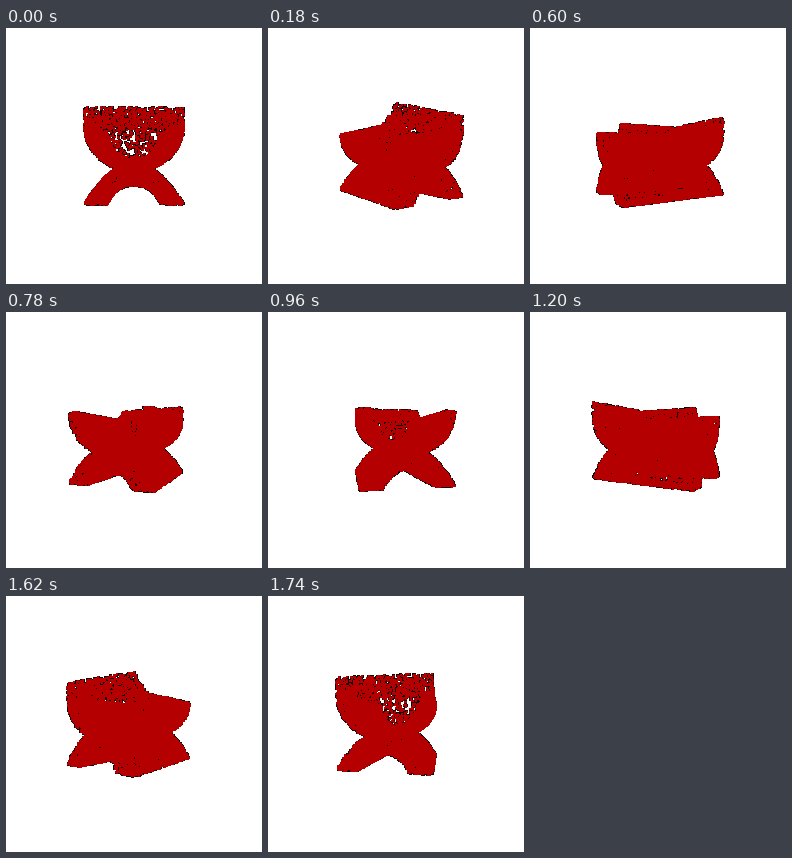
An HTML page with a canvas for the animation above (1.8 s loop, 256 by 256 pixels).

```html
<!DOCTYPE html>
<html lang="en">
<head>
<meta charset="utf-8">
<title>Turning chair</title>
<style>
html, body { margin: 0; width: 100%; height: 100%; overflow: hidden; background: #fff; }
canvas { display: block; width: 256px; height: 256px; }
</style>
</head>
<body>
<canvas id="stage" width="256" height="256"></canvas>
<script>
const SIZE = 256, MID = 128;
const LOOP = 1800, STEP = 60, STEPS = LOOP / STEP;
const DENSITY = 620, THIN = 270;  // points per unit of surface
const EYE = 5.5, ZOOM = 208;      // camera distance and scale
const DEPTH = 1.34;               // half length of the chair, front to back
const TOP = 0.98, ARM = 0.61, FLOOR = -0.97;
const BOWL = { rx: 1, ry: 0.92 }, HOLLOW = { rx: 0.8, ry: 0.74 };
const ARCH = { r: 0.57, y: -1.16 };
// Side profile of the back, as [z, y]
const BACK = [[0.9, ARM], [1.1, 0.75], [1.25, 0.79], [DEPTH, TOP]];

const ctx = document.getElementById("stage").getContext("2d");
const image = ctx.createImageData(SIZE, SIZE);
const pixels = new Uint32Array(image.data.buffer);
const WHITE = 0xffffffff, BLACK = 0xff000010, RED = 0xff0000b4;

let seed = 7;
function random() {
  seed = (Math.imul(seed, 1664525) + 1013904223) >>> 0;
  return seed / 4294967296;
}
const between = (a, b) => a + (b - a) * random();
const along = () => between(-DEPTH, DEPTH);

const points = [];
function scatter(area, density, place) {
  for (let i = Math.round(area * density); i > 0; i--) {
    const p = place();
    if (p) points.push(p);
  }
}

const legTop = x => -0.16 - (0.16 + FLOOR) * -x * x;
const within = (e, x, y) => Math.hypot(x / e.rx, (y - ARM) / e.ry) < 1;
const inSeat = (x, y) => y <= ARM && within(BOWL, x, y) && !within(HOLLOW, x, y);
const inLegs = (x, y) => y >= FLOOR && y <= legTop(x) && Math.hypot(x, y - ARCH.y) >= ARCH.r;

function backTop(z) {
  for (let i = 1; i < BACK.length; i++) {
    const [z0, y0] = BACK[i - 1], [z1, y1] = BACK[i];
    if (z <= z1) return y0 + (y1 - y0) * (z - z0) / (z1 - z0);
  }
  return TOP;
}

function addSeat() {
  for (const e of [BOWL, HOLLOW]) {
    scatter(Math.PI * e.rx * 2 * DEPTH, DENSITY, () => {
      const a = between(-Math.PI, 0);
      return [e.rx * Math.cos(a), ARM + e.ry * Math.sin(a), along()];
    });
  }
  for (const side of [-1, 1]) {
    scatter(0.2 * 2 * DEPTH, DENSITY, () => [side * between(HOLLOW.rx, 1), ARM, along()]);
  }
}

function addLegs() {
  scatter(2.7 * 2 * DEPTH, DENSITY, () => {
    const x = between(-1, 1);
    return [x, legTop(x), along()];
  });
  const spread = Math.acos((FLOOR - ARCH.y) / ARCH.r);
  scatter(2 * spread * ARCH.r * 2 * DEPTH, DENSITY, () => {
    const a = between(-spread, spread);
    return [ARCH.r * Math.sin(a), ARCH.y + ARCH.r * Math.cos(a), along()];
  });
  for (const side of [-1, 1]) {
    scatter(0.46 * 2 * DEPTH, DENSITY, () => [side * between(0.54, 1), FLOOR, along()]);
  }
}

function addEnds() {
  for (const z of [-DEPTH, DEPTH]) {
    scatter(4, DENSITY, () => {
      const x = between(-1, 1), y = between(-1, 1);
      return (inSeat(x, y) || inLegs(x, y)) && [x, y, z];
    });
  }
}

function addBack() {
  // Front and rear panels inside the bowl, the rear one reaching the top
  for (const [z, top] of [[BACK[0][0], ARM], [DEPTH, TOP]]) {
    scatter(4, THIN, () => {
      const x = between(-1, 1), y = between(-1, 1);
      return y <= top && (y > ARM || within(HOLLOW, x, y)) && [x, y, z];
    });
  }
  for (let i = 1; i < BACK.length; i++) {
    const [z0, y0] = BACK[i - 1], [z1, y1] = BACK[i];
    scatter(2 * Math.hypot(z1 - z0, y1 - y0), DENSITY, () => {
      const t = random();
      return [between(-1, 1), y0 + (y1 - y0) * t, z0 + (z1 - z0) * t];
    });
  }
  for (const x of [-1, 1]) {
    scatter((DEPTH - BACK[0][0]) * (TOP - ARM), DENSITY, () => {
      const z = between(BACK[0][0], DEPTH), y = between(ARM, TOP);
      return y <= backTop(z) && [x, y, z];
    });
  }
}

// Square of pixels with its upper left corner at index i
function square(i, side, colour) {
  for (let row = 0; row < side; row++, i += SIZE) pixels.fill(colour, i, i + side);
}

function draw(step) {
  const turn = step / STEPS * 2 * Math.PI;
  const c = Math.cos(turn), s = Math.sin(turn);
  const spots = points.map(([x, y, z]) => {
    const k = ZOOM / (EYE - z * c + x * s);
    const px = Math.round(MID - 0.5 + (x * c + z * s) * k);
    const py = Math.round(MID - 0.5 - y * k);
    return (py - 1) * SIZE + px - 1;
  });
  pixels.fill(WHITE);
  for (const i of spots) square(i, 3, BLACK);
  spots.forEach((i, n) => square(n % 2 ? i : i + SIZE + 1, 2, RED));
  ctx.putImageData(image, 0, 0);
}

addSeat();
addLegs();
addEnds();
addBack();

let shown = 0;
draw(shown);
const start = performance.now();
function tick() {
  const time = Math.max(0, performance.now() - start) % LOOP;
  const step = Math.floor(time / STEP);
  if (step !== shown) draw(shown = step);
  requestAnimationFrame(tick);
}
requestAnimationFrame(tick);
</script>
</body>
</html>
```
